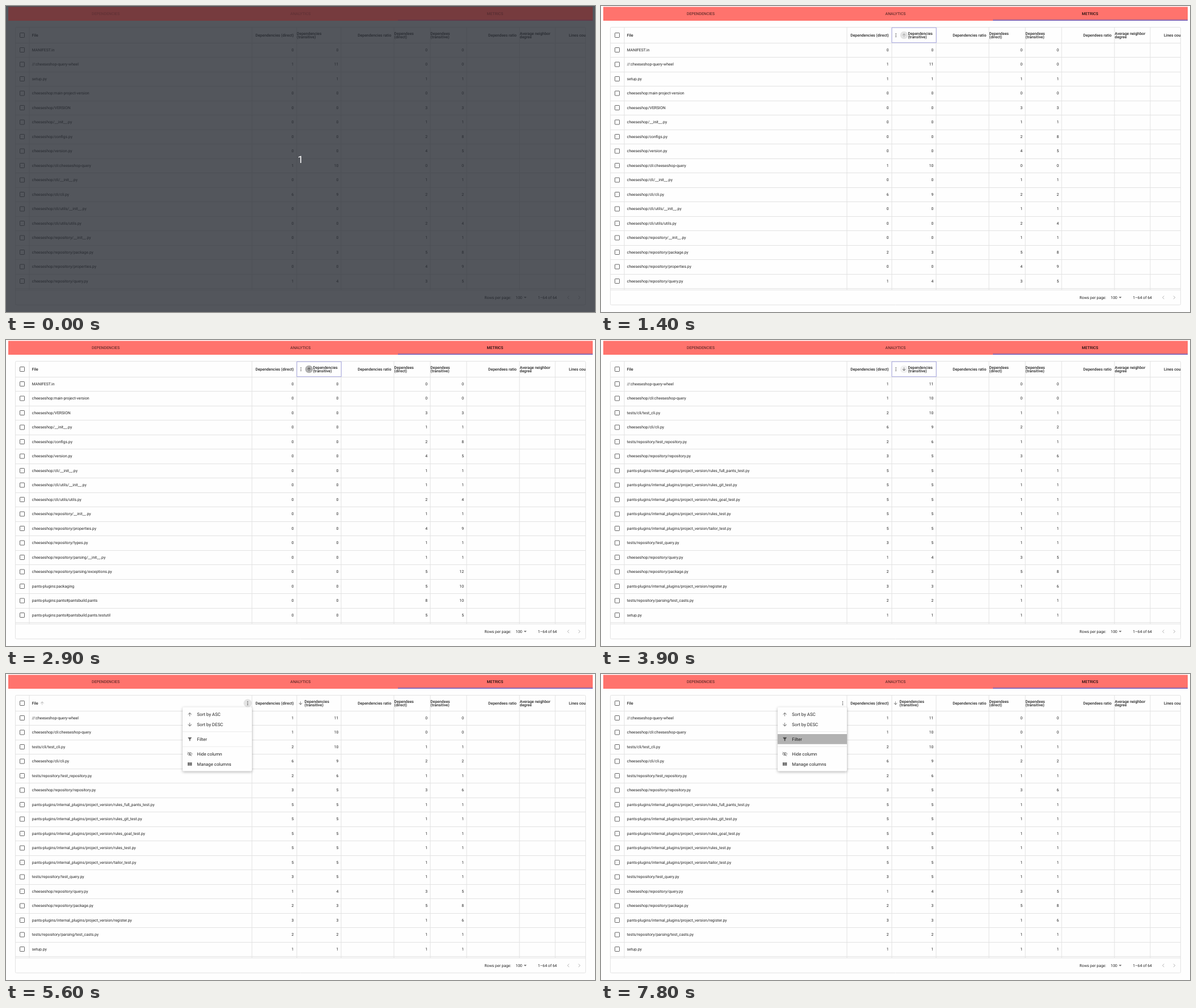
An HTML page with a canvas that plays this animation: 1037x540 px, repeating every 8000 ms.

```html
<!DOCTYPE html>
<html lang="en">
<head>
<meta charset="utf-8">
<title>Metrics table</title>
<style>
html, body { margin: 0; width: 100%; height: 100%; overflow: hidden; background: #fefefe; }
canvas { display: block; width: 1037px; height: 540px; }
</style>
</head>
<body>
<canvas width="1037" height="540"></canvas>
<script>
const ctx = document.querySelector('canvas').getContext('2d');
const LOOP = 8000;
const INK = 'rgba(0,0,0,.87)', MUTED = 'rgba(0,0,0,.6)', LINE = '#e2e2e2';
const PAPER = '#fefefe', CORAL = '#ff736d', ACCENT = '#6464c8', FOCUS = '#a8a8e2';
const ROW = 25.5, BODY_TOP = 65, BODY_END = 501;
const COLUMNS = [41, 433, 512, 590, 683, 747, 811, 904, 967];

// name, dependencies (direct, transitive), dependees (direct, transitive)
const files = `MANIFEST.in 0 0 0 0
//:cheeseshop-query-wheel 1 11 0 0
setup.py 1 1 1 1
cheeseshop:main-project-version 0 0 0 0
cheeseshop/VERSION 0 0 3 3
cheeseshop/__init__.py 0 0 1 1
cheeseshop/configs.py 0 0 2 8
cheeseshop/version.py 0 0 4 5
cheeseshop/cli:cheeseshop-query 1 10 0 0
cheeseshop/cli/__init__.py 0 0 1 1
cheeseshop/cli/cli.py 6 9 2 2
cheeseshop/cli/utils/__init__.py 0 0 1 1
cheeseshop/cli/utils/utils.py 0 0 2 4
cheeseshop/repository/__init__.py 0 0 1 1
cheeseshop/repository/package.py 2 3 5 8
cheeseshop/repository/properties.py 0 0 4 9
cheeseshop/repository/query.py 1 4 3 5
cheeseshop/repository/repository.py 3 5 3 6
cheeseshop/repository/types.py 0 0 1 1
cheeseshop/repository/parsing/__init__.py 0 0 1 1
cheeseshop/repository/parsing/exceptions.py 0 0 5 12
pants-plugins:packaging 0 0 5 10
pants-plugins:pants#pantsbuild.pants 0 0 8 10
pants-plugins:pants#pantsbuild.pants.testutil 0 0 5 5
pants-plugins/internal_plugins/project_version/register.py 3 3 1 6
pants-plugins/internal_plugins/project_version/rules_full_pants_test.py 5 5 1 1
pants-plugins/internal_plugins/project_version/rules_git_test.py 5 5 1 1
pants-plugins/internal_plugins/project_version/rules_goal_test.py 5 5 1 1
pants-plugins/internal_plugins/project_version/rules_test.py 5 5 1 1
pants-plugins/internal_plugins/project_version/tailor_test.py 5 5 1 1
tests/cli/test_cli.py 2 10 1 1
tests/repository/test_repository.py 2 6 1 1
tests/repository/test_query.py 3 5 1 1
tests/repository/parsing/test_casts.py 2 2 1 1`.split('\n').map(line => line.split(' '));
const ascending = [...files].sort((a, b) => a[2] - b[2]);
const descending = [...files].sort((a, b) => b[2] - a[2]);

const ARROW = new Path2D('M4 12l1.41 1.41L11 7.83V20h2V7.83l5.58 5.59L20 12l-8-8-8 8z');
const FUNNEL = new Path2D('M4 5.5L10 13v6q0 1 1 1h2q1 0 1-1v-6l6-7.5q.6-1.5-1-1.5H5q-1.600 0-1 1.500z');
const BARS = new Path2D('M3 5h5.33v14H3zM9.33 5h5.34v14H9.33zM15.67 5H21v14h-5.33z');
const EYE = new Path2D('M2 11.500C6 3 18 3 22 11.500C18 20 6 20 2 11.500Z');

// Value of the last [time, value] step already reached.
const stepAt = (t, steps, initial = 0) =>
  steps.reduce((value, [time, next]) => t >= time ? next : value, initial);

function text(str, x, y, { size = 6.87, weight = 400, color = INK, align = 'left' } = {}) {
  ctx.font = `${weight} ${size}px Roboto, sans-serif`;
  ctx.textAlign = align;
  ctx.fillStyle = color;
  ctx.fillText(str, x, y);
}

function rect(x, y, w, h, color) {
  ctx.fillStyle = color;
  ctx.fillRect(x, y, w, h);
}

function circle(x, y, r, color) {
  ctx.fillStyle = color;
  ctx.beginPath();
  ctx.arc(x, y, r, 0, 7);
  ctx.fill();
}

function outline(x, y, w, h, r, color, width = 1) {
  ctx.strokeStyle = color;
  ctx.lineWidth = width;
  ctx.beginPath();
  ctx.roundRect(x, y, w, h, r);
  ctx.stroke();
}

// Runs draw in a 24-unit icon box centred on x, y.
function icon(x, y, size, draw, flip = 1) {
  ctx.save();
  ctx.translate(x, y);
  ctx.scale(size / 24, size / 24 * flip);
  ctx.translate(-12, -12);
  ctx.fillStyle = ctx.strokeStyle = MUTED;
  draw();
  ctx.restore();
}

function arrow(x, y, { opacity = 1, down = false, size = 8.8 } = {}) {
  ctx.save();
  ctx.globalAlpha *= opacity;
  icon(x, y, size, () => ctx.fill(ARROW), down ? -1 : 1);
  ctx.restore();
}

function dots(x) {
  for (const dy of [-2.7, 0, 2.7]) circle(x, 51.5 + dy, .85, MUTED);
}

function chevron(x, direction) {
  ctx.strokeStyle = 'rgba(0,0,0,.3)';
  ctx.lineWidth = 1;
  ctx.beginPath();
  ctx.moveTo(x - 1.3 * direction, 511.6);
  ctx.lineTo(x + 1.3 * direction, 514.4);
  ctx.lineTo(x - 1.3 * direction, 517.2);
  ctx.stroke();
}

const checkbox = y => outline(24.5, y - 4, 8, 8, .8, MUTED);

function drawTabs() {
  rect(4, 1.5, 1029, 24.5, CORAL);
  rect(690, 24.3, 343, 1.5, ACCENT);
  const tab = (label, x, color) => text(label, x, 15.5, { weight: 500, align: 'center', color });
  tab('DEPENDENCIES', 175.5, MUTED);
  tab('ANALYTICS', 518.5, MUTED);
  tab('METRICS', 861, INK);
}

function drawGrid(rows) {
  for (const x of COLUMNS) rect(x - .5, 38, 1, BODY_END - 38, LINE);
  for (let i = 0; i < 18; i++) rect(16, Math.round(BODY_TOP - .5 + i * ROW), 1004, 1, LINE);
  rect(16, BODY_END - .5, 1004, 1, LINE);
  outline(16.5, 37.5, 1004, 490, 2, LINE);
  rows.slice(0, 17).forEach(([name, ...counts], i) => {
    const y = 77.5 + i * ROW;
    checkbox(y);
    text(name, 45.8, y + 2.4);
    counts.forEach((n, c) => text(n, [506.7, 585.4, 742.2, 806][c], y + 2.4, { align: 'right' }));
  });
}

function header(x, first, second, align) {
  const style = { weight: 500, align };
  text(first, x, second ? 50.5 : 53.8, style);
  if (second) text(second, x, 57.1, style);
}

function drawHeaders(t) {
  const hovered = t >= 100 && t < 4100;
  const sorted = t >= 1600, down = t >= 3000;
  checkbox(51.5);
  header(45.8, 'File');
  header(506.7, 'Dependencies (direct)', '', 'right');
  header(hovered ? 540.4 : t < 100 ? 512 : 525.5, 'Dependencies', '(transitive)');
  header(678.3, 'Dependencies ratio', '', 'right');
  header(683.6, 'Dependees', '(direct)');
  header(747.3, 'Dependees', '(transitive)');
  header(899, 'Dependees ratio', '', 'right');
  header(904.5, 'Average neighbor', 'degree');
  header(991, 'Lines cou');

  if (hovered) {
    dots(519.3);
    const ripple = stepAt(t, [[1400, .1], [1500, .2], [1600, .26], [1700, .15], [1800, .08], [2000, .05],
      [2600, .12], [2700, .2], [2800, .27], [2900, .3], [3000, .2], [3100, .08], [3900, .05]]);
    circle(533.5, 51.5, 6.8, `rgba(0,0,0,${ripple})`);
    arrow(533.5, 51.5, { opacity: sorted ? 1 : stepAt(t, [[200, .3], [300, .5]]), down });
  } else if (sorted) {
    arrow(518.6, 51.5, { down });
  }
  if (t >= 1400 && t < 4700) outline(512, 38.2, 78.3, 26.5, 0, FOCUS);

  if (t >= 4100) {
    const ripple = stepAt(t, [[4700, .12], [4800, .22], [4900, .3], [5100, .18], [5200, .1], [6300, 0]]);
    circle(425.5, 51.5, 7.2, `rgba(0,0,0,${ripple})`);
    dots(425.5);
    if (t < 6300) arrow(63.7, 51.5, { opacity: .5 });
  }
  if (t >= 4700 && t < 5400) outline(41.3, 38.2, 391.5, 26.5, 0, FOCUS);
}

function drawFooter() {
  text('Rows per page:', 842.5, 516.7);
  text('100', 897.3, 516.7);
  text('1–64 of 64', 936.5, 516.7);
  ctx.fillStyle = MUTED;
  ctx.beginPath();
  ctx.moveTo(911.6, 513.3);
  ctx.lineTo(916.6, 513.3);
  ctx.lineTo(914.1, 515.8);
  ctx.fill();
  chevron(990, -1);
  chevron(1009.3, 1);
}

function hiddenEye() {
  ctx.lineWidth = 2;
  ctx.stroke(EYE);
  ctx.beginPath();
  ctx.arc(12, 11.5, 4, 0, 7);
  ctx.fill();
  const slash = (color, width, shift) => {
    ctx.strokeStyle = color;
    ctx.lineWidth = width;
    ctx.beginPath();
    ctx.moveTo(2.7 + shift, 3.2 - shift);
    ctx.lineTo(20.4 + shift, 20.9 - shift);
    ctx.stroke();
  };
  slash(PAPER, 2, 1.4);
  slash('#666', 2, 0);
}

function drawMenu(t) {
  if (t < 5400) return;
  const grow = stepAt(t, [[5400, .4], [5500, .82], [5600, 1]]);
  const left = 311, top = 58.5, width = 122, height = 113;
  ctx.save();
  ctx.globalAlpha = grow;
  ctx.translate(left + width, top);
  ctx.scale(.75 + .25 * grow, .56 + .44 * grow);
  ctx.translate(-left - width, -top);

  ctx.save();
  ctx.shadowColor = 'rgba(0,0,0,.3)';
  ctx.shadowBlur = 5;
  ctx.shadowOffsetY = 1.5;
  ctx.fillStyle = PAPER;
  ctx.beginPath();
  ctx.roundRect(left, top, width, height, 2);
  ctx.fill();
  ctx.restore();
  for (const y of [101.5, 127.7]) rect(left, y, width, .7, LINE);

  const radius = stepAt(t, [[7100, 26], [7200, 46], [7300, 58], [7500, 66], [7700, 69], [7800, 72]]);
  if (radius) {
    ctx.save();
    ctx.beginPath();
    ctx.rect(left, 106, width, 17.7);
    ctx.clip();
    circle(380, 115, radius, `rgba(0,0,0,${stepAt(t, [[7100, .14], [7200, .2], [7300, .25], [7500, .3]])})`);
    ctx.restore();
  }

  const items = { 'Sort by ASC': 71.2, 'Sort by DESC': 89, 'Filter': 114.9, 'Hide column': 141.1, 'Manage columns': 158.8 };
  for (const [label, y] of Object.entries(items)) text(label, 336.3, y + 2.8, { size: 7.85 });
  arrow(323.6, 71.2, { size: 9.8 });
  arrow(323.6, 89.2, { size: 9.8, down: true });
  icon(323.6, 115, 9.8, () => ctx.fill(FUNNEL));
  icon(323.6, 141.2, 9.8, hiddenEye);
  icon(323.6, 158.8, 9.8, () => ctx.fill(BARS));
  ctx.restore();
}

function drawCountdown() {
  rect(0, 0, 1037, 540, 'rgba(40,44,52,.8)');
  rect(4, 1.5, 1029, 24.5, 'rgba(200,60,60,.3)');
  text('1', 518.3, 276.5, { size: 17.5, color: '#fff', align: 'center' });
}

function draw(t) {
  ctx.textRendering = 'geometricPrecision';
  rect(0, 0, 1037, 540, PAPER);
  drawTabs();
  drawGrid(t < 1600 ? files : t < 3000 ? ascending : descending);
  drawHeaders(t);
  drawFooter();
  drawMenu(t);
  if (t < 100) drawCountdown();
}

const start = performance.now();
function tick() {
  draw((performance.now() - start) % LOOP);
  requestAnimationFrame(tick);
}
tick();
</script>
</body>
</html>
```
